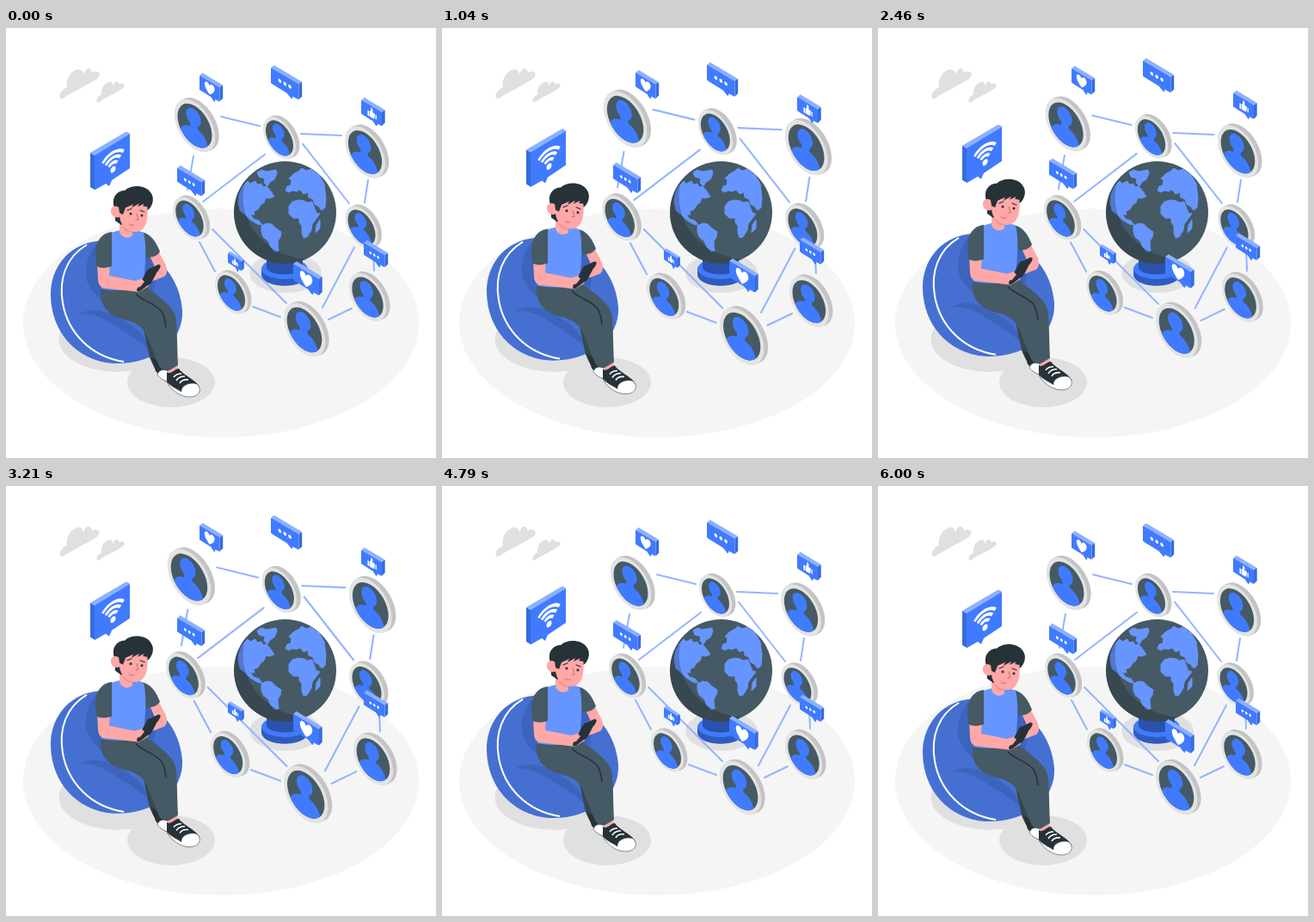
An HTML page that plays this animation: 500x500 px, repeating every 6040 ms.

```html
<!DOCTYPE html>
<html lang="en">
<head>
<meta charset="utf-8">
<title>Connected world</title>
<style>
html, body { margin: 0; width: 100%; height: 100%; overflow: hidden; background: #fff; }
svg { display: block; width: 100vw; height: 100vh; }
</style>
</head>
<body>
<svg viewBox="0 0 500 500">
  <defs>
    <path id="cloud" fill="#e0e0e0" d="M64 82C60 79 64 72 71 69C69 60 75 49 85 48C89 49 90 52 90 55C92 46 98 44 100 52C107 48 111 53 107 58C100 64 76 75 69 80Q66 83 64 82Z"/>
    <clipPath id="face"><circle r=".84"/></clipPath>
    <clipPath id="ball"><circle cx="324.5" cy="214.5" r="59.5"/></clipPath>
    <g id="user">
      <circle r="1" fill="#e3e3e3"/>
      <circle r=".84" fill="#455a64"/>
      <g clip-path="url(#face)" fill="#407bff">
        <ellipse cx="-.06" cy="-.33" rx=".36" ry=".36"/>
        <path d="M-.22 -.1H.14V.1C.45 .16 .66 .34 .7 .9H-.8C-.76 .36 -.55 .18 -.22 .12Z"/>
      </g>
    </g>
    <g id="dots" fill="#fff"><circle cx="-7.5" r="2.3"/><circle r="2.3"/><circle cx="7.5" r="2.3"/></g>
    <path id="heart" fill="#fff" d="M0 8C-4 5 -8 1 -8 -3C-8 -8 -2 -9 0 -4C2 -9 8 -8 8 -3C8 1 4 5 0 8Z"/>
    <path id="thumb" fill="#fff" d="M-7 -1H-4V7H-7ZM-3 -1L-1 -4V-8C1 -9 3 -7 2 -2H5Q7 -1 6 1L5 6Q4 7 3 7H-3ZM7 -1H9V6H7Z"/>
  </defs>

  <ellipse cx="250" cy="343" rx="230" ry="133" fill="#f5f5f5"/>
  <use href="#cloud"/>
  <use href="#cloud" transform="translate(61.6 29) scale(.7)"/>
  <g fill="#e0e0e0">
    <ellipse cx="130" cy="362" rx="68.5" ry="38"/>
    <ellipse cx="192" cy="412" rx="51" ry="29"/>
    <ellipse cx="325" cy="285" rx="42" ry="23"/>
  </g>

  <!-- globe -->
  <path fill="#2f5bbf" d="M297 280V287C299 304 349 304 351 287V280Z"/>
  <ellipse cx="324" cy="280" rx="27" ry="12" fill="#407bff"/>
  <path fill="#2a52ac" d="M303 262V279C306 289 342 289 345 279V262Z"/>
  <circle cx="324.5" cy="214.5" r="59.5" fill="#455a64"/>
  <g clip-path="url(#ball)">
    <path fill="#6695ff" stroke="#6695ff" stroke-linejoin="round" d="
      M292 168L297 165L303 167L314 165L315 169L312 176L307 179L304 184L300 180L301 175L294 173Z
      M271 194L275 184L281 178L284 181L290 178L292 182L297 181L299 185L303 184L308 190L312 196L306 198L302 197L300 203L296 206L293 211L288 213L289 217L284 217L288 222L294 224L298 229L292 228L284 223L278 217L272 212L270 202Z
      M297 230L303 227L309 228L314 233L320 237L319 243L316 248L317 259L313 260L308 255L305 248L299 243L297 237Z
      M325 189L327 184L331 183L332 177L329 175L334 170L341 166L344 163L349 166L355 164L364 171L370 181L372 197L371 209L367 212L363 207L359 205L357 199L352 197L351 191L346 193L342 188L338 190L333 189L329 191Z
      M329 207L333 202L340 200L347 201L350 203L356 202L359 210L361 215L365 216L359 224L356 228L355 235L350 243L346 244L344 238L344 230L341 226L341 221L334 221L329 216Z
      M361 229L365 223L365 233L360 238Z
      M303 192L307 190L308 194Z"/>
    <path fill="#000" opacity=".2" d="M282 170C262 208 290 264 349 269L340 280H255V170Z"/>
  </g>

  <g id="net"></g>

  <g id="float">
    <!-- bean bag -->
    <path fill="#4570d2" d="M105 248C72 252 51 280 52 312C53 352 80 386 124 390C170 392 207 366 205 328C203 300 188 276 165 262C148 250 124 244 105 248Z"/>
    <path fill="#3c64bd" d="M108 249C93 262 88 288 98 302C104 312 112 318 122 322L170 320L178 262C160 250 128 245 108 249Z"/>
    <path fill="#3c64bd" d="M84 333C100 323 122 329 140 342C158 352 166 366 171 380C160 365 140 355 125 345C110 335 98 331 84 333Z"/>
    <path fill="none" stroke="#fff" stroke-width="2" d="M94 252C70 266 61 292 66 320C72 354 98 382 137 388"/>
    <!-- legs and shoes -->
    <path fill="#37474f" d="M160 350L167 383C170 391 173 395 177 402L189 396L184 350Z"/>
    <path fill="#263238" d="M169 383L174 399L184 410L190 412L188 395Z"/>
    <path fill="#fff" stroke="#37474f" stroke-width=".6" d="M176 403C178 397 184 396 190 400L196 413C186 412 179 408 176 403Z"/>
    <path fill="#ffa8a7" d="M187 392L199 390L200 399L190 402Z"/>
    <path fill="#455a64" d="M110 304C108 320 117 333 134 338C150 342 158 346 163 356L178 393Q181 399 190 398L200 392C199 372 199 352 198 340C197 326 182 315 164 302Z"/>
    <path fill="none" stroke="#263238" stroke-width="1.6" d="M151 309C157 317 174 320 181 330Q185 337 186 348"/>
    <path fill="#263238" d="M187 400C191 404 197 396 201 396C206 404 223 410 225 418C226 428 211 431 205 427C197 421 187 417 187 410Z"/>
    <path fill="#fff" stroke="#37474f" stroke-width=".6" d="M187 411C193 418 200 420 204 423C203 416 214 411 222 414C228 419 226 428 215 429C202 430 190 419 187 411Z"/>
    <path fill="none" stroke="#fff" stroke-width="1.6" d="M195 406Q198 402 204 402M198 410Q201 405 208 405M202 413Q205 408 212 409"/>
    <!-- body -->
    <path fill="#ffa8a7" d="M164 258L178 261L186 276Q189 285 184 289L171 294L164 288L174 280Z"/>
    <path fill="#455a64" d="M157 237C169 239 175 250 179 260C176 265 170 267 163 267Z"/>
    <path fill="#6695ff" d="M122 238L133 235H152L160 238C164 254 162 274 160 300C146 306 124 306 111 303L119 262Z"/>
    <path fill="#ffa8a7" d="M132 222L147 229V241C143 246 134 244 132 237Z"/>
    <path fill="#f28f8f" d="M135 230L147 234V238C141 238 137 235 135 230Z"/>
    <path fill="#ffa8a7" d="M106 274H121L120 288L150 294L160 291L166 300L155 307L112 302Q107 299 107 292Z"/>
    <path fill="#455a64" d="M123 237C111 239 105 247 104 260L105 277C111 280 118 279 123 277Z"/>
    <path fill="#263238" d="M152 304L164 282Q166 279 169 279L177 275Q181 275 179 279L169 296Q168 298 165 299L156 306Q152 308 152 304Z"/>
    <path fill="#ffa8a7" d="M149 295L158 292L161 295L156 301L151 302ZM172 291L176 283L182 283L184 288Z"/>
    <!-- head -->
    <path fill="#263238" d="M126 209C122 196 130 189 138 189C146 181 163 183 168 191C173 197 171 206 166 211L134 229L127 224Z"/>
    <path fill="#ffa8a7" d="M133 207L140 201L164 205C166 219 164 235 152 237C141 238 133 230 132 219Z"/>
    <path fill="#ffa8a7" d="M132 209C127 205 121 208 122 214C123 220 129 222 133 219Z"/>
    <path fill="#263238" d="M131 208C134 198 144 195 164 198L168 201L164 208L159 207L161 204L153 208L155 204L146 209L148 205L139 209L136 217L132 215Z"/>
    <g fill="#263238"><circle cx="145" cy="216" r="1.5"/><circle cx="158" cy="218" r="1.5"/></g>
    <path fill="none" stroke="#263238" stroke-width="1.1" stroke-linecap="round" d="M141 212L146 210M156 212L161 214"/>
    <path fill="none" stroke="#c76d70" stroke-width="1" stroke-linecap="round" d="M152 216L154 223L151 223M143 228Q146 231 149 229"/>
    <!-- wireless sign -->
    <path fill="#366bdf" d="M98 145L103 148V188L98 185Z"/>
    <path fill="#8cb0ff" d="M98 145L139 121Q141 120 144 123L103 148Z"/>
    <path fill="#407bff" d="M103 148L144 123V163L123 177L120 184L116 181L103 188.500Z"/>
    <g transform="matrix(.866 -.5 0 1 124.500 164.500)" fill="none" stroke="#fff" stroke-width="3.6">
      <circle r="3.500" fill="#fff" stroke="none"/>
      <path d="M-5.700 -5.700A8 8 0 0 1 5.700 -5.700M-9.900 -9.900A14 14 0 0 1 9.900 -9.900M-14.100 -14.100A20 20 0 0 1 14.100 -14.100"/>
    </g>
  </g>
</svg>
<script>
const net = document.getElementById('net'), float = document.getElementById('float');
const PLANE = '.866 .5 0 1';

// Links and user discs
const links = [
  [250, 103, 295, 114], [343, 123, 390, 125], [301, 147, 229, 202], [345, 135, 399, 204],
  [218, 149, 211, 188], [421, 177, 417, 203], [225, 249, 243, 283], [240, 234, 326, 320],
  [287, 324, 319, 336], [375, 339, 402, 326], [368, 325, 405, 255], [427, 258, 428, 282]
];
const users = [
  [219.5, 113.7, 27.5], [318, 128, 22], [417.5, 144.5, 27], [213.5, 221.5, 22.3],
  [413.5, 231.8, 22], [262, 308, 22], [347, 351, 28], [420.5, 313, 25]
];
function disc([x, y, r]) {
  let s = '';
  for (let i = 4; i > 0; i--)
    s += `<circle r="${r}" fill="#c4c4c4" transform="matrix(${PLANE} ${x + i * 1.1} ${y - i * .5})"/>`;
  return s + `<use href="#user" transform="matrix(${PLANE} ${x} ${y}) scale(${r})"/>`;
}
net.innerHTML = `<path fill="none" stroke="#94b5ff" stroke-width="2" stroke-linecap="round" d="${
  links.map(([a, b, c, d]) => `M${a} ${b}L${c} ${d}`).join('')}"/>` + users.map(disc).join('');

// Speech bubbles: left, top, width, height, icon, icon scale
const bubbles = [
  [308, 46.5, 32.5, 18, 'dots', .9], [225, 55.5, 23.5, 16.5, 'heart', .85],
  [413, 84, 24, 16, 'thumb', .75], [199, 163, 28.5, 16, 'dots', .75],
  [258, 262, 16, 11, 'thumb', .52], [416, 250, 24.5, 14, 'dots', .68],
  [334, 274.5, 30, 19, 'heart', 1.05]
];
function bubble([x, y, w, h, icon, k]) {
  const d = w * .577, e = w > 20 ? 3.7 : 2.8, at = f => `${x + w * f} ${y + d * f + h}`;
  const rim = `stroke-width="1" stroke-linejoin="round"`;
  return `<path fill="#8cb0ff" stroke="#8cb0ff" ${rim} d="M${x + .5} ${y}l${e - .5} ${1 - e}l${w - 1} ${d}l${-e} ${e}Z"/>
    <path fill="#366bdf" d="M${x + w} ${y + d}l${e} ${1 - e}v${h - 1}l${-e} ${e}Z"/>
    <path fill="#407bff" stroke="#407bff" ${rim} d="M${x + .5} ${y + .5}l${w - 1} ${d}v${h - 1}L${at(.78)}l-1 3L${at(.58)}L${x + .5} ${y + h - .5}Z"/>
    <use href="#${icon}" transform="matrix(${PLANE} ${x + w / 2} ${y + (d + h) / 2}) scale(${k})"/>`;
}
float.insertAdjacentHTML('beforeend', bubbles.map(bubble).join(''));

// Two linear beats followed by a rest
const beats = [[0, 0], [.1, 1], [.3, 0], [.4, 0], [.5, 1], [.6, 0], [1, 0]];
function beat(p) {
  const i = beats.findIndex(b => b[0] > p), [a, u] = beats[i - 1], [b, v] = beats[i];
  return u + (v - u) * (p - a) / (b - a);
}
const start = performance.now();
function draw(now) {
  const p = Math.max(0, now - start) % 6040 % 6000 / 6000;
  const lift = -10 * (1 - Math.abs(1 - 2 * p));
  float.setAttribute('transform', `translate(0 ${lift})`);
  net.setAttribute('transform', `translate(320.5 231) scale(${1 + .1 * beat(p)}) translate(-320.5 -231)`);
  requestAnimationFrame(draw);
}
draw(start);
</script>
</body>
</html>
```
